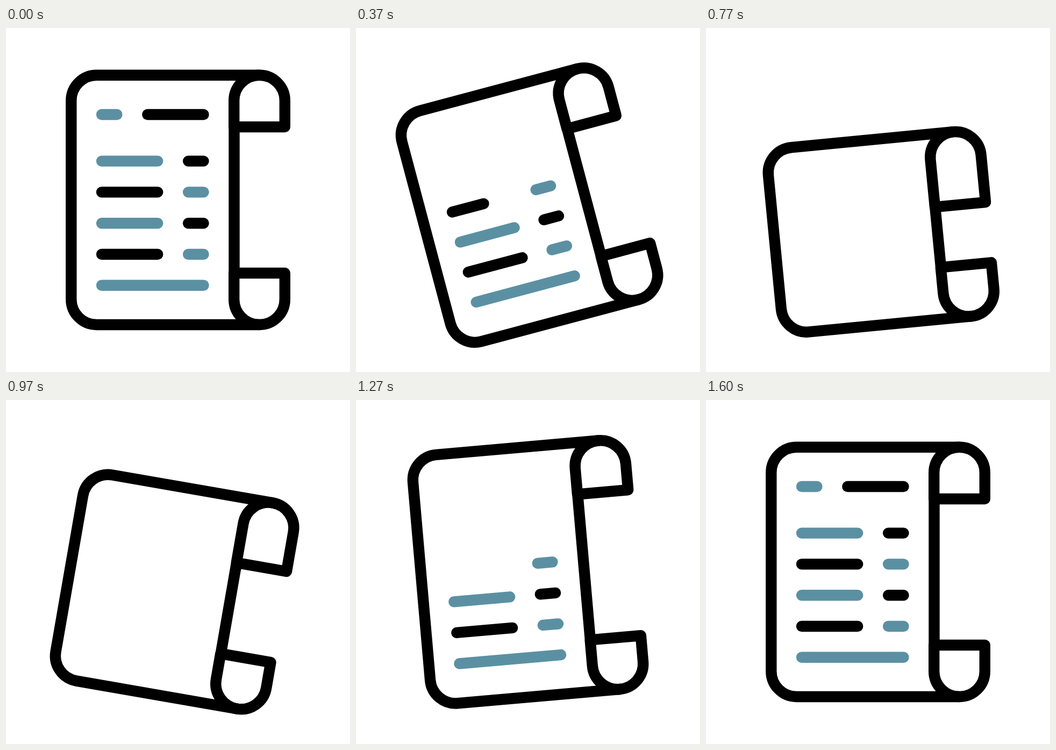
These frames come from a looping animation (640x640 px, 2000 ms). An HTML page with a canvas:

```html
<!DOCTYPE html>
<html lang="en">
<head>
<meta charset="utf-8">
<title>Rolling receipt</title>
<style>
  html, body { margin: 0; height: 100%; overflow: hidden; background: #fff; }
  canvas { display: block; }
</style>
</head>
<body>
<canvas width="640" height="640"></canvas>
<script>
const ctx = document.querySelector('canvas').getContext('2d');
const INK = '#000', BLUE = '#5b90a3';
const LOOP = 2000, STEP = 100 / 3, REST = 1600;
const LEFT = 121.3, SPINE = 424.2, RIGHT = 518.8, TOP = 87.8, BOTTOM = 552;
const RADIUS = 47.3;

// [time, degrees]
const SWING = [[0, 0], [590, -21], [950, 10], [1255, -5], [1600, 0]];
// [time, how far the top is rolled down]
const ROLL = [[0, 0], [200, 0], [800, 1], [1200, 0], [1600, 0]];

// [x, y, length, colour] in the order in which they disappear
const bars = [[178, 161, 28.4, BLUE], [263.3, 161, 104.2, INK]];
for (let row = 0; row < 4; row++) {
  const y = 247.6 + row * 57.8;
  const colours = row % 2 ? [INK, BLUE] : [BLUE, INK];
  bars.push([178, y, 104.2, colours[0]], [339.1, y, 28.4, colours[1]]);
}
bars.push([178, 478.8, 189.5, BLUE]);

const clamp = v => Math.min(1, Math.max(0, v));

// cubic-bezier(.42, 0, .58, 1)
function easeInOut(x) {
  let lo = 0, hi = 1, u = 0.5;
  for (let i = 0; i < 24; i++) {
    u = (lo + hi) / 2;
    const v = 1 - u;
    if (1.26 * u * v * v + 1.74 * u * u * v + u ** 3 < x) lo = u; else hi = u;
  }
  return u * u * (3 - 2 * u);
}

function valueAt(keys, t) {
  const next = keys.findIndex(key => key[0] > t);
  if (next < 0) return keys[keys.length - 1][1];
  const [t0, a] = keys[next - 1], [t1, b] = keys[next];
  return a + (b - a) * easeInOut((t - t0) / (t1 - t0));
}

function barAmount(i, t) {
  return t < 800
    ? 1 - clamp((t - 195) / 39.6 - i)
    : clamp((t - 995) / 46 - (bars.length - 1 - i));
}

function stroke(colour, trace) {
  ctx.strokeStyle = colour;
  ctx.beginPath();
  trace();
  ctx.stroke();
}

// Curled end of the paper; edge is the outer y, flap the y of the cut
function curl(edge, flap) {
  stroke(INK, () => {
    ctx.moveTo(SPINE, flap);
    ctx.arcTo(SPINE, edge, SPINE + RADIUS, edge, RADIUS);
    ctx.arcTo(RIGHT, edge, RIGHT, flap, RADIUS);
    ctx.lineTo(RIGHT, flap);
    ctx.closePath();
  });
}

function draw(t) {
  const roll = valueAt(ROLL, t);
  const top = TOP + 120 * roll, flap = 184 + 160 * roll;

  ctx.fillStyle = '#fff';
  ctx.fillRect(0, 0, 640, 640);
  ctx.save();
  ctx.translate(320, 320);
  ctx.rotate(valueAt(SWING, t) * Math.PI / 180);
  ctx.translate(-320, -320);
  ctx.lineWidth = 20.4;
  ctx.lineCap = ctx.lineJoin = 'round';

  stroke(INK, () => {
    ctx.moveTo(SPINE + RADIUS, top);
    ctx.arcTo(LEFT, top, LEFT, BOTTOM, RADIUS);
    ctx.arcTo(LEFT, BOTTOM, SPINE, BOTTOM, RADIUS);
    ctx.lineTo(SPINE + RADIUS, BOTTOM);
    ctx.moveTo(SPINE + 0.3, flap);
    ctx.lineTo(SPINE + 0.3, 456);
  });
  curl(top, flap);
  curl(BOTTOM, 456);

  bars.forEach(([x, y, length, colour], i) => {
    const amount = barAmount(i, t);
    if (amount > 0) stroke(colour, () => {
      ctx.moveTo(x, y);
      ctx.lineTo(x + length * amount, y);
    });
  });
  ctx.restore();
}

const start = performance.now();
function tick() {
  const t = (performance.now() - start) % LOOP;
  const step = Math.floor((t + 4) / STEP);
  draw(Math.min(REST, Math.round(step * STEP / 10) * 10));
  requestAnimationFrame(tick);
}
tick();
</script>
</body>
</html>
```
